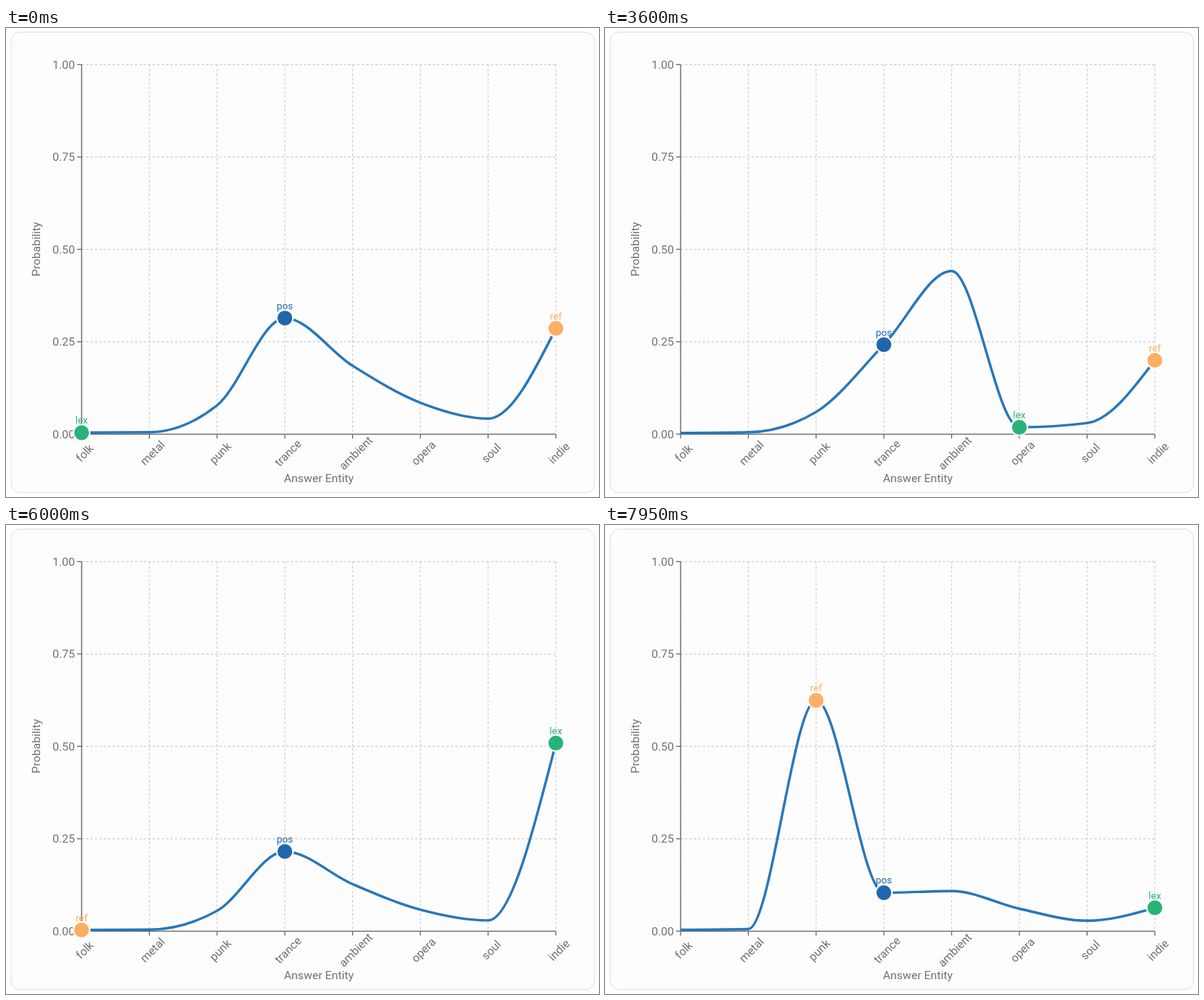
Recreate the animation shown at these times as an HTML page. Size 800 px wide and 632 px high, loop 8 s.

```html
<!DOCTYPE html>
<html lang="en">
<head>
<meta charset="utf-8">
<title>Answer probabilities</title>
<style>
  html, body { margin: 0; width: 100%; height: 100%; overflow: hidden; background: #fff; }
  svg { display: block; font-family: Roboto, "Liberation Sans", sans-serif; }
  .axis { stroke: #666; stroke-width: 1.3; fill: none; }
  .grid { stroke: #ccc; stroke-width: 1.2; stroke-dasharray: 3 3; }
  .text { fill: #707070; font-size: 15.5px; }
  .tag { font-size: 13.3px; text-anchor: middle; }
</style>
</head>
<body>
<svg id="chart" width="800" height="632" viewBox="0 0 800 632">
  <rect x="7" y="5.5" width="787" height="620.5" rx="12" fill="#fdfdfd" stroke="#ddd"/>
</svg>
<script>
const LOOP = 8000, STEP = 50, STAGE = 800, LEAD = 400, DURATION = 500, OFFSET = 42;
const LEFT = 102, GAP = 91.4, BASE = 547.3, HEIGHT = 498;
const POS = 3;
const words = ['folk', 'metal', 'punk', 'trance', 'ambient', 'opera', 'soul', 'indie'];
const LAST = words.length - 1;
const colors = {
  lex: '#2ab27b', pos: '#2166ac', ref: '#fdae61',
  'lex+pos': '#268c94', 'lex+ref': '#8fb26e'
};

// One probability distribution per stage.
const stages = [
  [.004, .005, .078, .314, .185, .085, .042, .286],
  [.004, .0075, .073, .307, .186, .086, .043, .293],
  [.004, .0125, .363, .021, .118, .095, .0475, .335],
  [.003, .007, .055, .667, .045, .0195, .015, .185],
  [.003, .005, .06, .242, .442, .018, .03, .2],
  [.004, .0045, .068, .329, .175, .24, .016, .163],
  [.005, .005, .079, .3115, .186, .084, .147, .183],
  [.003, .004, .055, .215, .127, .058, .029, .51],
  [.058, .0065, .089, .382, .216, .101, .0535, .0945],
  [.004, .08, .04, .377, .22, .104, .055, .115],
  [.0035, .0025, .649, .0926, .104, .059, .027, .061]
];

const chart = document.getElementById('chart');
const xAt = i => LEFT + GAP * i;
const yAt = v => BASE - HEIGHT * v;

function add(name, attrs, text) {
  const node = document.createElementNS('http://www.w3.org/2000/svg', name);
  for (const key in attrs) node.setAttribute(key, attrs[key]);
  if (text) node.textContent = text;
  return chart.appendChild(node);
}

function drawFrame() {
  const right = xAt(LAST), top = yAt(1);
  for (let v = 0; v <= 1; v += .25) {
    const y = yAt(v);
    add('path', { class: 'grid', d: `M${LEFT} ${y}H${right}` });
    add('path', { class: 'axis', d: `M${LEFT - 6} ${y}h6` });
    add('text', { class: 'text', x: 93, y: y + 5.5, 'text-anchor': 'end' }, v.toFixed(2));
  }
  words.forEach((word, i) => {
    const x = xAt(i);
    add('path', { class: 'grid', d: `M${x} ${top}V${BASE}` });
    add('path', { class: 'axis', d: `M${x} ${BASE}v6` });
    add('text', {
      class: 'text', 'text-anchor': 'middle',
      transform: `translate(${x + 8} 576.5) rotate(-45)`
    }, word);
  });
  add('path', { class: 'axis', d: `M${LEFT} ${top}V${BASE}H${right}` });
  add('text', { class: 'text', x: 422, y: 612, 'text-anchor': 'middle' }, 'Answer Entity');
  add('text', {
    class: 'text', 'text-anchor': 'middle', transform: 'translate(46 298) rotate(-90)'
  }, 'Probability');
}

// Monotone cubic curve through evenly spaced points.
function curvePath(ys) {
  const rise = ys.slice(1).map((y, i) => y - ys[i]);
  const slope = ys.map((_, i) => {
    const a = rise[i - 1], b = rise[i];
    if (a === undefined || b === undefined) return 0;
    return (Math.sign(a) + Math.sign(b)) *
      Math.min(Math.abs(a), Math.abs(b), Math.abs(a + b) / 4);
  });
  slope[0] = (3 * rise[0] - slope[1]) / 2;
  slope[LAST] = (3 * rise[LAST - 1] - slope[LAST - 1]) / 2;
  let d = `M${LEFT} ${ys[0]}`;
  for (let i = 0; i < LAST; i++) {
    d += `C${xAt(i + 1 / 3)} ${ys[i] + slope[i] / 3} ` +
      `${xAt(i + 2 / 3)} ${ys[i + 1] - slope[i + 1] / 3} ${xAt(i + 1)} ${ys[i + 1]}`;
  }
  return d;
}

const ease = p => p < .5 ? 4 * p ** 3 : 1 - 4 * (1 - p) ** 3;

drawFrame();
const curve = add('path', { fill: 'none', stroke: '#2877b8', 'stroke-width': 3.4 });
const markers = words.map((_, i) => ({
  dot: add('circle', { cx: xAt(i), r: 11, stroke: '#fff', 'stroke-width': 2 }),
  tag: add('text', { class: 'tag', x: xAt(i) })
}));

function render(time) {
  const t = Math.floor(time / STEP) * STEP;
  const stage = Math.floor((t + LEAD) / STAGE);
  const elapsed = (t + LEAD) % STAGE;
  const p = ease(Math.min(1, (elapsed + OFFSET) / DURATION));
  const to = stages[stage], from = stages[stage - 1] || to;
  const ys = to.map((v, i) => yAt(from[i] + (v - from[i]) * p));
  curve.setAttribute('d', curvePath(ys));

  const places = {
    lex: Math.min(stage, LAST),
    pos: POS,
    ref: stage > LAST ? stage - LAST - 1 : LAST
  };
  markers.forEach(({ dot, tag }, i) => {
    const name = Object.keys(places).filter(key => places[key] === i).join('+');
    const color = colors[name] || 'none';
    dot.setAttribute('visibility', name ? 'visible' : 'hidden');
    dot.setAttribute('cy', ys[i]);
    dot.setAttribute('fill', color);
    tag.setAttribute('y', ys[i] - 12);
    tag.setAttribute('fill', color);
    tag.textContent = name;
  });
}

const start = performance.now();
function tick() {
  render((performance.now() - start) % LOOP);
  requestAnimationFrame(tick);
}
tick();
</script>
</body>
</html>
```
